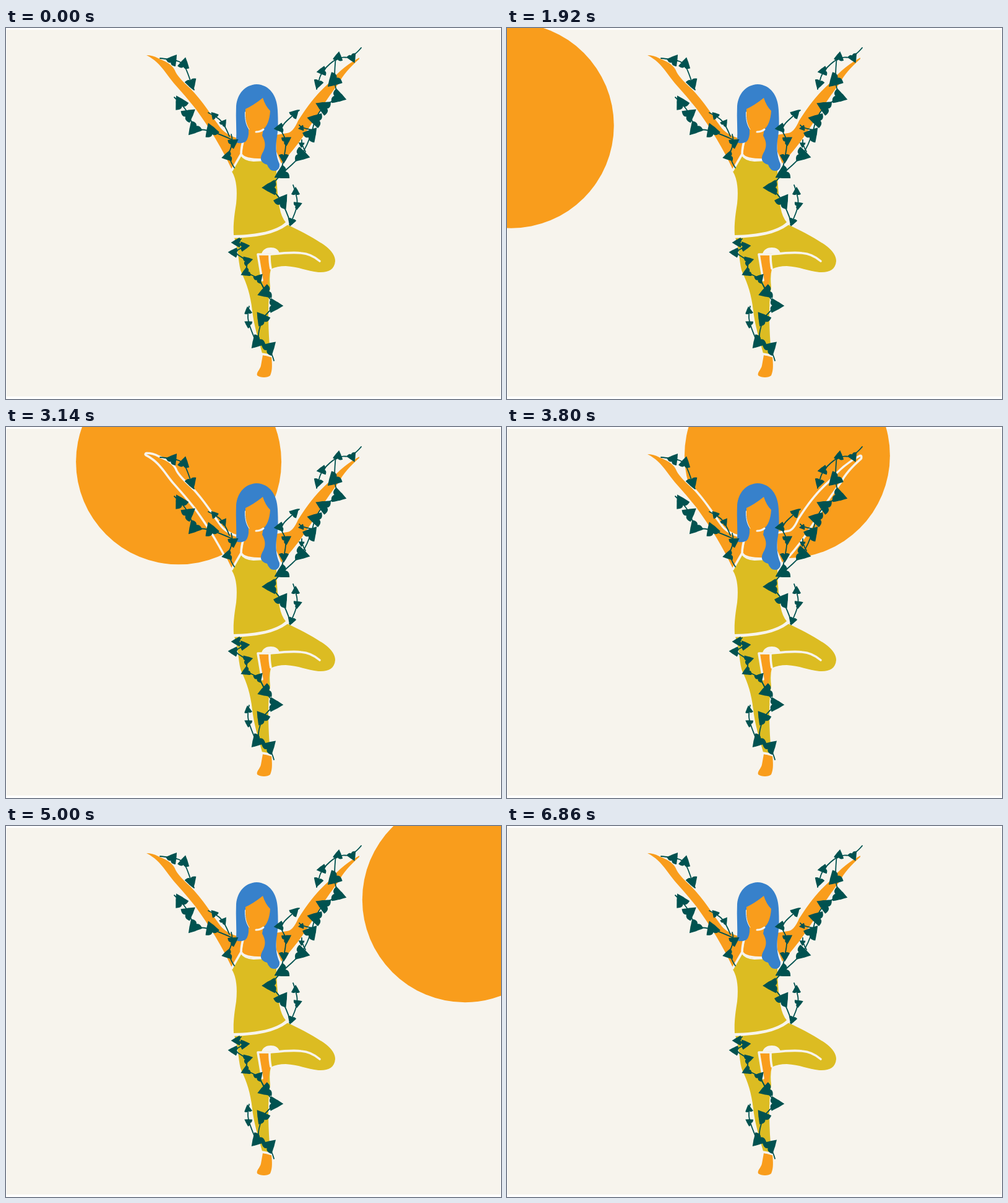
An HTML page that plays this animation: 800 by 600 pixels, repeating every 7.2 s.

```html
<!DOCTYPE html>
<html lang="en">
<head>
<meta charset="utf-8">
<title>Tree pose</title>
<style>
  html, body { margin: 0; width: 100%; height: 100%; overflow: hidden; background: #fff; }
  #stage { position: absolute; left: 0; top: 0; width: 800px; height: 600px; overflow: hidden; }
  #paper { position: absolute; left: 1px; top: 3px; width: 798px; height: 593px; background: #f7f4ed; }
  #sun {
    position: absolute; left: 0; top: 0; width: 332px; height: 332px;
    border-radius: 50%; background: #f99d1c;
    offset-path: path("M-167.5 297C152 -36 657 -37 972 283");
    offset-rotate: 0deg;
  }
  svg { position: absolute; left: 0; top: 0; }
  .skin { fill: #f99d1c; }
  .arm { stroke: #f7f4ed; stroke-width: 7; stroke-linejoin: round; paint-order: stroke; }
  .cloth { fill: #dcbc22; }
  .hair { fill: #3781cb; }
  .gap { fill: #f7f4ed; }
  .seam { fill: none; stroke: #f7f4ed; stroke-width: 3.6; stroke-linecap: round; stroke-linejoin: round; }
  .leaf { fill: #005250; }
  .stem { fill: none; stroke: #005250; stroke-width: 1.8; stroke-linecap: round; }
</style>
</head>
<body>
<div id="stage">
  <div id="paper"></div>
  <div id="sun"></div>
  <svg width="800" height="600" viewBox="0 0 800 600">
    <!-- arms -->
    <path class="skin arm" d="M227 44Q237 44 246 49C260 55 270 60 274 71Q279 81 298 98C318 118 332 142 347 162Q359 176 383 180L381 204L365 229C350 196 330 163 306 130Q290 110 271 89C257 72 249 55 227 44Z"/>
    <path class="skin arm" d="M571 48C556 56 540 67 523 88C500 108 485 130 472 150Q464 169 454 170L436 173L437 200L445 219C471 191 488 165 505 137C516 119 529 101 538 89Q547 71 571 50Z"/>

    <!-- neck and chest -->
    <path class="skin" d="M390 158L418 158L421 214L398 214Q385 212 381 204L384 184Z"/>

    <!-- top -->
    <path class="cloth" d="M379 206Q384 215 400 216L420 215L437 228C437 250 439 272 442 290Q445 306 452 314C437 328 408 334 368 335C367 318 369 303 372 284C374 264 373 245 365 232Z"/>
    <path class="seam" d="M383 184Q380 195 380 204Q384 213 414 213M380 204L365 230"/>

    <!-- leggings -->
    <path class="cloth" d="M369 339C405 338 434 333 454 318C474 327 499 340 517 353C527 361 532 369 532 377C531 391 520 396 505 395C486 393 473 386 452 385Q438 385 428 390Q425 401 427 419C423 442 423 479 427 528L414 526C409 506 401 484 398 457C395 431 389 413 381 397C375 383 377 363 369 339Z"/>
    <path class="seam" d="M368 338C405 337 434 332 454 317"/>
    <path class="gap" d="M413 365C415 358 421 355 428 355C435 355 440 358 442 364Z"/>
    <path class="skin" d="M409 367L426 368Q426 380 428 387C425 399 424 412 420 425Q416 421 415 410Z"/>
    <path class="seam" d="M414 408L407 366L428 366C446 364 463 362 477 364C491 365 500 371 507 377M426 368Q426 380 428 389"/>

    <!-- foot -->
    <path class="skin" d="M415 529L429 531C430 543 431 553 427 562C423 566 411 566 406 562C404 557 411 552 412 546Z"/>
    <path class="seam" d="M413 527Q421 528 430 531"/>

    <!-- head -->
    <path class="hair" d="M405 91C386 92 374 106 372 126C371 146 373 165 372 185Q379 188 387 184Q393 178 392 164L416 163L414 174C420 185 420 193 414 203C410 211 411 218 422 221Q426 232 435 231Q443 229 442 220C436 207 436 193 437 182C440 168 440 151 439 133C438 109 426 92 405 91Z"/>
    <path class="skin" d="M387 131Q400 125 415 113Q419 126 427 134C426 149 422 160 414 165C406 169 397 168 392 163C387 155 387 141 387 131Z"/>
    <path class="seam" style="stroke-width:1" d="M386.5 136C386 148 388 157 393 164"/>
    <path class="seam" style="stroke-width:3" d="M404 168Q411 168 416 164"/>

    <g id="vines"></g>
  </svg>
</div>
<script>
  const ivy = "M0-.34C.14-.54.36-.46.54-.36C.42-.12.32.02.27.14Q.14.34 0 .56Q-.14.34-.27.14C-.32.02-.42-.12-.54-.36C-.36-.46-.14-.54 0-.34Z";
  const layer = document.getElementById("vines");

  function addPath(cls, d, transform = "") {
    const el = document.createElementNS("http://www.w3.org/2000/svg", "path");
    el.setAttribute("class", cls);
    el.setAttribute("d", d);
    el.setAttribute("transform", transform);
    layer.append(el);
  }

  const middle = (a, b) => [(a[0] + b[0]) / 2, (a[1] + b[1]) / 2];

  // The stem cuts the corners of the route; a leaf grows out of every bend.
  function vine(leafSize, route) {
    const points = route.split(" ").map(p => p.split(",").map(Number));
    const last = points.length - 1;
    let stem = `M${points[0]}`;
    for (let i = 1; i < last; i++) {
      const [x, y] = points[i];
      const end = i === last - 1 ? points[last] : middle(points[i], points[i + 1]);
      stem += `Q${x},${y} ${end}`;

      const [mx, my] = middle(points[i - 1], points[i + 1]);
      const angle = Math.atan2(mx - x, y - my) * 180 / Math.PI;
      addPath("leaf", ivy, `translate(${x} ${y}) rotate(${angle}) scale(${leafSize})`);
    }
    addPath("stem", stem);
  }

  // left arm
  vine(18, "249,49 270,51 288,57 300,91 304,100");
  vine(22, "272,112 281,120 296,139 303,164 331,165 364,180");
  vine(12, "327,137 336,141 352,153 361,175");
  vine(16, "364,172 368,185 357,208 369,226");
  // right arm and waist
  vine(15, "574,32 560,49 537,46 510,70 504,91 502,99");
  vine(23, "533,47 529,86 538,112 512,127 499,148 494,171 479,206 445,236 426,258 447,279 459,313");
  vine(15, "474,133 467,138 441,162 454,181 449,211 444,236");
  vine(9, "496,165 477,162 474,157");
  vine(9, "484,200 477,188 478,181");
  vine(13, "464,254 468,264 472,286 461,314 458,318");
  // standing leg
  vine(15, "380,341 372,347 386,353 367,363 391,376 387,396 409,404 419,425");
  vine(22, "409,404 418,428 436,449 413,469 405,509 427,516 433,538");
  vine(12, "393,450 391,457 391,478 404,507");

  document.getElementById("sun").animate(
    [{ offsetDistance: "0%" }, { offsetDistance: "100%" }],
    { duration: 7200, iterations: Infinity, easing: "cubic-bezier(0.3333, 0, 0.6667, 1)" }
  );
</script>
</body>
</html>
```
